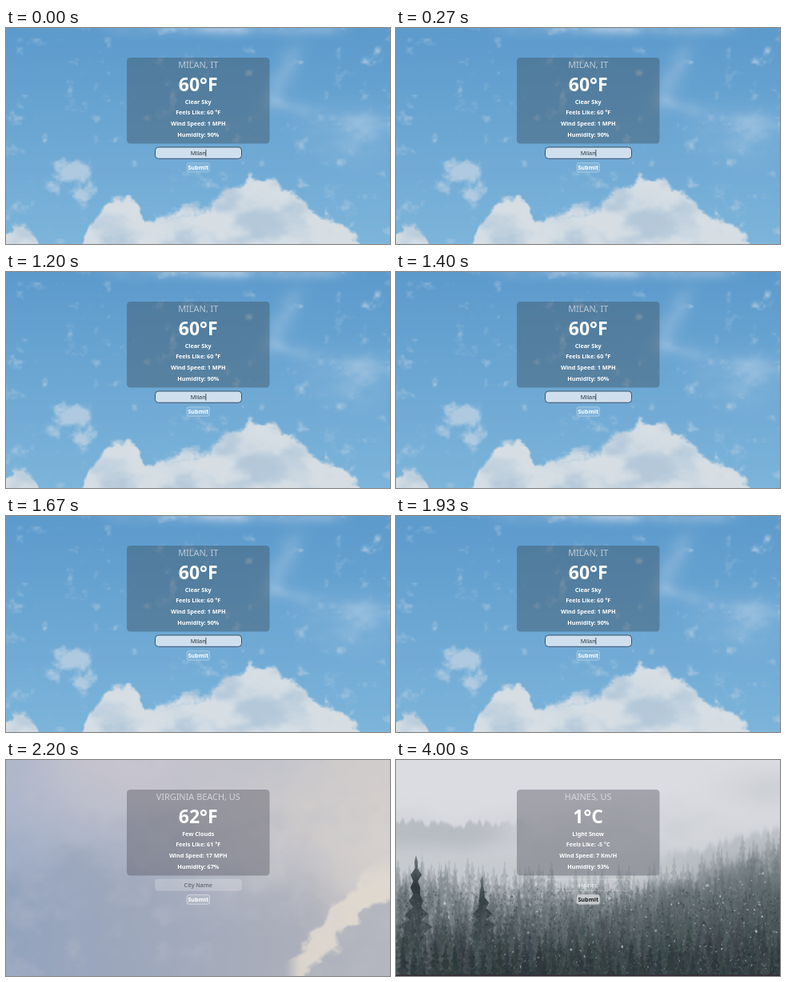
Write an HTML page with a canvas that moves like this. It is 480x270 px and loops after 5990 ms.

```html
<!DOCTYPE html>
<html lang="en">
<head>
<meta charset="utf-8">
<title>Weather</title>
<style>
  html, body { margin: 0; width: 100%; height: 100%; overflow: hidden; background: #6aa5cf; }
  canvas { display: block; width: 100%; height: 100%; }
</style>
</head>
<body>
<canvas id="stage" width="480" height="270"></canvas>
<script>
const W = 480, H = 270, LOOP = 5990;
const FONT = '"Noto Sans", "Open Sans", sans-serif';
const ctx = document.getElementById('stage').getContext('2d');

const lerp = (a, b, t) => a + (b - a) * t;
const mix = (a, b, t) => a.map((v, i) => lerp(v, b[i], t));
const rgba = (color, alpha) => `rgba(${color.map(Math.round)},${alpha})`;
const bell = (x, center, width) => Math.exp(-(((x - center) / width) ** 2));
const glow = (x, y, cx, cy, rx, ry) => bell(x, cx, rx) * bell(y, cy, ry);

function smooth(from, to, x) {
  const t = Math.min(1, Math.max(0, (x - from) / (to - from)));
  return t * t * (3 - 2 * t);
}

function hash(x, y) {
  let h = Math.imul(x, 374761393) + Math.imul(y, 668265263);
  h = Math.imul(h ^ (h >>> 13), 1274126177);
  return ((h ^ (h >>> 16)) >>> 0) / 4294967296;
}

function noise(x, y) {
  const i = Math.floor(x), j = Math.floor(y);
  const u = smooth(0, 1, x - i), v = smooth(0, 1, y - j);
  return lerp(lerp(hash(i, j), hash(i + 1, j), u), lerp(hash(i, j + 1), hash(i + 1, j + 1), u), v);
}

// Layered noise, centred on zero
function fbm(x, y) {
  let sum = 0;
  for (let k = 0, amp = 1; k < 4; k++, amp /= 2) {
    sum += amp * (noise(x * 2 ** k + k * 17, y * 2 ** k) - 0.5);
  }
  return sum;
}

function seeded(seed) {
  let n = 0;
  return () => hash(n++, seed);
}

function backdrop(shade, decorate) {
  const c = document.createElement('canvas');
  c.width = W;
  c.height = H;
  const g = c.getContext('2d');
  const img = g.createImageData(W, H);
  for (let y = 0, p = 0; y < H; y++) {
    for (let x = 0; x < W; x++, p += 4) img.data.set([...shade(x, y), 255], p);
  }
  g.putImageData(img, 0, 0);
  if (decorate) decorate(g);
  return c;
}

const dome = (x, center, radius, top, drop) => top + drop * ((x - center) / radius) ** 2;

function blueSky(x, y) {
  const wide = fbm(x / 45, y / 30), fine = fbm(x / 16, y / 14);
  let c = mix([92, 154, 204], [124, 180, 218], y / H);

  // Thin high cloud
  const streak = bell(y, 92 + (x - 330) * 0.22, 10) * smooth(315, 350, x) * 0.2;
  const rising = bell(x, 372 - y * 0.45, 16) * bell(y, 65, 42) * 0.2;
  const puff = glow(x, y, 434, 132, 44, 27) * 0.42;
  const top = bell(y, 0, 9) * smooth(90, 190, x) * smooth(450, 370, x) * 0.4;
  c = mix(c, [196, 214, 232], (streak + rising + puff + top) * Math.max(0, 1 + wide * 1.3));

  // Loose cloud on the left
  const loose = glow(x, y, 84, 174, 25, 13) + glow(x, y, 60, 197, 20, 15) + glow(x, y, 98, 207, 14, 24);
  c = mix(c, [199, 214, 228], smooth(0.25, 1.1, loose + fine * 1.1) * 0.72);

  // Cumulus bank built from overlapping domes
  const ridge = Math.min(
    dome(x, 140, 45, 207, 60), dome(x, 222, 80, 226, 40),
    dome(x, 315, 100, 191, 70), dome(x, 396, 45, 236, 30), dome(x, 15, 24, 247, 20));
  const depth = y - ridge + fine * 17;
  const shadow = smooth(-0.1, 0.75, wide + depth / 130) * 0.7;
  const cloud = mix([220, 225, 229], [168, 192, 213], shadow);
  return mix(c, cloud, smooth(-4, 6, depth) * 0.94);
}

function greyClouds(x, y) {
  const wide = fbm(x / 85, y / 65), fine = fbm(x / 28, y / 24);
  let c = mix([166, 178, 202], [207, 203, 203], smooth(-40, 460, x + wide * 90));
  c = mix(c, [204, 199, 207], glow(x, y, 150, 0, 130, 75) * 0.8);

  // Dark bank below, thinning out towards the right
  const bank = smooth(70, 185, y + wide * 75 + fine * 25) * smooth(460, 350, x + fine * 40);
  c = mix(c, mix([143, 159, 186], [162, 167, 182], x / 350), bank * 0.78);
  c = mix(c, [216, 210, 206], glow(x, y, 475, 95, 85, 75) * 0.65);

  // Bright diagonal gap with a grey cloud under it
  const across = (x - 422) * 0.73 + (y - 194) * 0.68 + fine * 24;
  c = mix(c, [174, 178, 188], smooth(8, 22, across) * smooth(350, 400, x) * 0.85);
  const gap = smooth(21, 12, Math.abs(across)) * smooth(345, 370, x) * smooth(110, 155, y);
  c = mix(c, [225, 218, 208], gap * 0.88);
  return mix(c, [188, 192, 202], Math.max(0, fine) * 0.45);
}

function fog(x, y) {
  const wide = fbm(x / 70, y / 35), jag = noise(x / 4, 3) * 9 + noise(x / 14, 8) * 9;
  let c = mix([219, 220, 225], [198, 202, 207], smooth(30, 150, y - wide * 35));
  c = mix(c, [194, 198, 203], glow(x, y, 475, 35, 65, 24) * 0.5);
  const left = smooth(85, 92, y + jag) * smooth(125, 88, y) * smooth(190, 90, x);
  const slope = y + (x - 330) * 0.24;
  const right = smooth(125, 138, slope + jag) * smooth(300, 390, x);
  c = mix(c, [157, 164, 171], left * 0.5 + right * 0.4);
  return mix(c, [70, 81, 85], smooth(135, 215, slope + wide * 30) * 0.9);
}

function tree(g, rnd, x, top, height, color, alpha) {
  const fade = g.createLinearGradient(0, top, 0, top + height);
  fade.addColorStop(0, rgba(color, alpha * 0.5));
  fade.addColorStop(0.3, rgba(color, alpha));
  fade.addColorStop(1, rgba(color, 0));
  g.fillStyle = fade;
  g.beginPath();
  g.moveTo(x, top);
  for (const side of [1, -1]) {
    for (let i = 1; i < 16; i++) {
      const level = side > 0 ? i : 16 - i;
      const reach = (0.5 + height * 0.012 * level) * (i % 2 ? 1 : 0.45) * (0.6 + rnd() * 0.8);
      g.lineTo(x + side * reach, top + height * level / 16);
    }
  }
  g.fill();
}

function forest(g) {
  const rnd = seeded(37);
  const rows = 12;
  for (let k = 0; k < rows; k++) {
    const near = k / (rows - 1);
    for (let x = -5; x < W + 5; x += lerp(6, 12, near) * (0.5 + rnd())) {
      const rise = 42 * smooth(290, 480, x) + 14 * smooth(150, 0, x);
      const top = lerp(140, 238, near) - rise * (1 - near) + (rnd() - 0.5) * 30;
      const color = mix([112, 123, 128], [43, 54, 56], near).map(v => v + near * 8 * (rnd() - 0.5));
      tree(g, rnd, x, top, 55 + rnd() * 35, color, lerp(0.3, 0.75, near));
    }
  }
  tree(g, rnd, 25, 119, 130, [43, 53, 56], 0.95);
  tree(g, rnd, 108, 144, 110, [50, 61, 64], 0.9);

  // Foliage grain, then snow, heavier on the right
  for (let i = 0; i < 3200; i++) {
    const x = rnd() * W, y = lerp(160, H, rnd());
    g.fillStyle = rnd() < 0.5 ? 'rgba(25,34,36,.22)' : 'rgba(135,147,151,.17)';
    g.fillRect(x, y, 1 + rnd() * 1.5, 1 + rnd() * 2);
  }
  for (let i = 0; i < 260; i++) {
    const x = W * Math.sqrt(rnd());
    const y = lerp(185 - 50 * x / W, 262, rnd() ** 1.3);
    g.fillStyle = rgba([220, 225, 228], 0.2 + rnd() * 0.5);
    g.beginPath();
    g.ellipse(x, y, 0.4 + rnd() ** 3 * 1.5, 0.4 + rnd() ** 2 * 1.6, rnd(), 0, 7);
    g.fill();
  }
  g.fillStyle = '#342b31';
  g.fillRect(0, 268.5, W, 1.5);
}

const scenes = [
  {
    until: 2000, back: backdrop(blueSky), card: 'rgba(58,78,92,.42)',
    rows: ['MILAN, IT', '60°F', 'Clear Sky', 'Feels Like: 60 °F', 'Wind Speed: 1 MPH', 'Humidity: 90%'],
    field: { text: 'Milan', ink: '#29323a', fill: 'rgba(225,233,243,.85)', edge: '#37536b', caret: true },
    button: { ink: '#fff', fill: 'rgba(255,255,255,.12)', edge: 'rgba(255,255,255,.28)' }
  },
  {
    until: 4000, back: backdrop(greyClouds), card: 'rgba(85,85,95,.42)',
    rows: ['VIRGINIA BEACH, US', '62°F', 'Few Clouds', 'Feels Like: 61 °F', 'Wind Speed: 17 MPH', 'Humidity: 67%'],
    field: { text: 'City Name', ink: '#50535a', fill: 'rgba(255,255,255,.2)', edge: 'rgba(255,255,255,.1)' },
    button: { ink: '#fff', fill: 'rgba(255,255,255,.12)', edge: 'rgba(255,255,255,.4)' }
  },
  {
    until: LOOP, back: backdrop(fog, forest), card: 'rgba(85,85,95,.42)',
    rows: ['HAINES, US', '1°C', 'Light Snow', 'Feels Like: -5 °C', 'Wind Speed: 7 Km/H', 'Humidity: 93%'],
    field: { text: 'Haines', ink: '#f4f5f6', fill: 'rgba(255,255,255,.04)', edge: 'rgba(255,255,255,.22)' },
    button: { ink: '#15191b', fill: 'rgba(205,207,208,.9)', edge: 'rgba(215,215,215,.5)' }
  }
];

function box(x, y, w, h, r, fill, edge) {
  ctx.beginPath();
  ctx.roundRect(x, y, w, h, r);
  ctx.fillStyle = fill;
  ctx.fill();
  if (!edge) return;
  ctx.strokeStyle = edge;
  ctx.lineWidth = 1;
  ctx.stroke();
}

function label(text, y, size, color, weight = 600) {
  ctx.font = `${weight} ${size}px ${FONT}`;
  ctx.fillStyle = color;
  ctx.fillText(text, 240.2, y);
}

function draw(t) {
  const { back, card, rows, field, button } = scenes.find(s => t < s.until);
  ctx.drawImage(back, 0, 0);
  ctx.textAlign = 'center';
  box(151, 37, 178.5, 107.5, 4.5, card);
  label(rows[0], 50, 10.9, 'rgba(255,255,255,.6)', 400);
  label(rows[1], 78.7, 23, '#fff', 700);
  rows.slice(2).forEach((text, i) => label(text, 94.6 + i * 13.65, 7.2, '#fff'));

  box(186.5, 149, 108, 14.3, 4, field.fill, field.edge);
  label(field.text, 158.7, 7.3, field.ink, 500);
  if (field.caret) {
    ctx.fillStyle = field.ink;
    ctx.fillRect(249.5, 152, 0.8, 8.5);
  }

  // The button outline settles just after the loop starts
  box(226, 168.5, 28.5, 11.8, 2.5, button.fill, t < 70 ? 'rgba(255,255,255,.18)' : button.edge);
  label('Submit', 177.2, 7.2, button.ink);
}

function frame() {
  draw(performance.now() % LOOP);
  requestAnimationFrame(frame);
}
frame();
</script>
</body>
</html>
```
